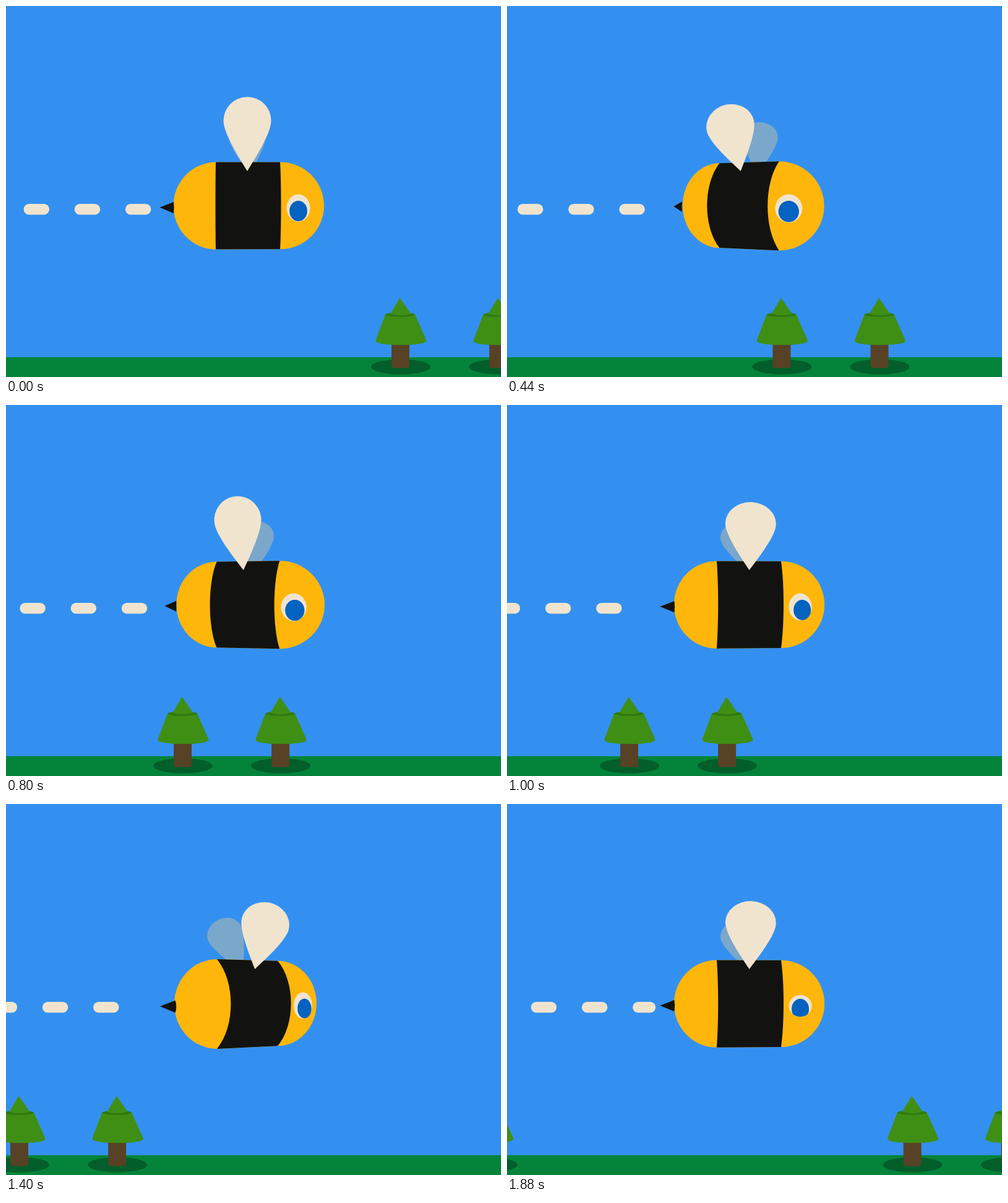
These frames come from a looping animation (800 by 600 pixels, 1920 ms). An HTML page with a canvas:

```html
<!DOCTYPE html>
<html lang="en">
<head>
<meta charset="utf-8">
<title>Flying bee</title>
<style>
html, body { margin: 0; width: 100%; height: 100%; overflow: hidden; background: #3490f0; }
canvas { display: block; }
</style>
</head>
<body>
<canvas id="stage" width="800" height="600"></canvas>
<script>
const ctx = document.getElementById('stage').getContext('2d');
const LOOP = 1920, STEP = 40, TAU = Math.PI * 2;
const CREAM = '#f0e4ce', BLACK = '#121310', YELLOW = '#ffb60a', LEAF = '#3f8f14';

function fill(color, path) {
  ctx.fillStyle = color;
  ctx.fill(typeof path === 'string' ? new Path2D(path) : path);
}

function oval(x, y, rx, ry) {
  const p = new Path2D();
  p.ellipse(x, y, Math.max(rx, 0), Math.max(ry, 0), 0, 0, TAU);
  return p;
}

function at(x, y, angle, draw) {
  ctx.save();
  ctx.translate(x, y);
  ctx.rotate(angle);
  draw();
  ctx.restore();
}

function tree(x) {
  at(x, 0, 0, () => {
    fill('#025e2a', oval(1.4, 583.5, 48, 12.2));
    fill('#574226', 'M-13.6 540H15.4V582Q15.4 585.5 11 585.5H-9Q-13.6 585.5 -13.6 582Z');
    fill(LEAF, 'M-23.5 499L-39.4 541Q-40 548 2 548.2Q43.5 548 43 541L24.5 499Z');
    fill('#2f7812', oval(.5, 499.2, 24, 3.6));
    fill(LEAF, 'M0 472L-15.5 498Q1 502.5 18 498Z');
  });
}

function trail(t) {
  ctx.strokeStyle = CREAM;
  ctx.lineWidth = 17.6;
  ctx.lineCap = 'round';
  ctx.setLineDash([23.9, 58.3]);
  ctx.lineDashOffset = -137.3 + .2132 * t;
  ctx.beginPath();
  ctx.moveTo(-100, 328.7);
  ctx.lineTo(231.4, 328.7);
  ctx.stroke();
}

// Teardrop from its tip to the centre of its round head
function wing(color, tipX, tipY, headX, headY, rx, ry) {
  const dx = headX - tipX, dy = tipY - headY, d = Math.hypot(dx, dy);
  at(tipX, tipY, Math.atan2(dx, dy), () => fill(color,
    `M0 0C${-.39 * rx} ${-.3 * d} ${-rx} ${-.76 * d} ${-rx} ${-d}` +
    `A${rx} ${ry} 0 0 1 ${rx} ${-d}C${rx} ${-.76 * d} ${.39 * rx} ${-.3 * d} 0 0Z`));
}

function eye(t, s, turn) {
  const open = Math.min(1, Math.abs(t - 1720) / 200);
  const x = turn(472.5, 12.4, -5), rx = turn(19, -3.6, -.6);
  const white = oval(x, 326.6 - .8 * s, rx, (22.1 - .7 * s) * open);
  const ramp = Math.min(1, Math.max(0, (t - 640) / 320));
  const gaze = t < 1720 ? .165 * ramp * ramp * (3 - 2 * ramp) : 0;
  fill(CREAM, white);
  ctx.save();
  if (t >= 1600) ctx.clip(white);
  fill('#0462c0', oval(x + gaze * rx, 331.5 - .8 * s, .757 * rx, 16.6 - .7 * s));
  ctx.restore();
}

function bee(t) {
  const s = -Math.sin(TAU * t / LOOP);
  const flap = Math.cos(TAU * t / 160);
  const turn = (mid, a, b = 0) => mid + a * s + b * s * s;

  wing('#7ba7cb', turn(394, -11), 272, turn(381, -28) + 9 * flap, turn(210.5, -1.5),
    turn(33, 0, -4) - 3 * flap, 24);

  const left = turn(270.5, -6, 7.5), right = turn(514, -5.4, -6.8);
  const l = turn(339, -1.3, 3.2), r = turn(443, -.3, -3.6);
  const lTop = turn(252.6, -1.6), lEnd = turn(393.5, 2.4);
  const rTop = turn(252.5, 1.2), rEnd = turn(393.3, -2.1);
  fill(YELLOW, `M${l} ${lTop}L${r} ${rTop}` +
    `A${right - r} ${(rEnd - rTop) / 2} 0 0 1 ${r} ${rEnd}L${l} ${lEnd}` +
    `A${l - left} ${(lEnd - lTop) / 2} 0 0 1 ${l} ${lTop}Z`);

  const lBend = l + turn(-.5, 21.5, 1.8) * 4 / 3, rBend = r + turn(1.5, 20.2) * 4 / 3;
  const lq = (lEnd - lTop) / 4, rq = (rEnd - rTop) / 4;
  fill(BLACK, `M${l} ${lTop}L${r} ${rTop}` +
    `C${rBend} ${rTop + rq} ${rBend} ${rEnd - rq} ${r} ${rEnd}L${l} ${lEnd}` +
    `C${lBend} ${lEnd - lq} ${lBend} ${lTop + lq} ${l} ${lTop}Z`);

  const base = left + .5 + 1.3 * s, top = turn(317, .7), end = turn(335.2, 2.3);
  fill(BLACK, `M${turn(248.5, -10.4, 10.7)} ${turn(325.7, 1.5)}L${base} ${top}` +
    `Q${base + 1 + 2 * s} ${(top + end) / 2} ${base} ${end}Z`);

  eye(t, s, turn);

  const tilt = turn(0, 13) * Math.PI / 180, reach = 75 + 6.5 * flap, tip = turn(390, 12.4);
  wing(CREAM, tip, 267, tip + reach * Math.sin(tilt), 267 - reach * Math.cos(tilt),
    turn(41, 0, -2) - 2.5 * flap, 35 + 3.5 * flap);
}

function frame() {
  const t = Math.floor(performance.now() / STEP) * STEP % LOOP;
  ctx.fillStyle = '#3490f0';
  ctx.fillRect(0, 0, 800, 600);
  ctx.fillStyle = '#04843a';
  ctx.fillRect(0, 568, 800, 32);
  const span = .44 * LOOP;
  for (const start of [636.6, 794.7]) {
    const x = start - .44 * t;
    tree(x);
    tree(x + span);
  }
  trail(t);
  bee(t);
  requestAnimationFrame(frame);
}
frame();
</script>
</body>
</html>
```
